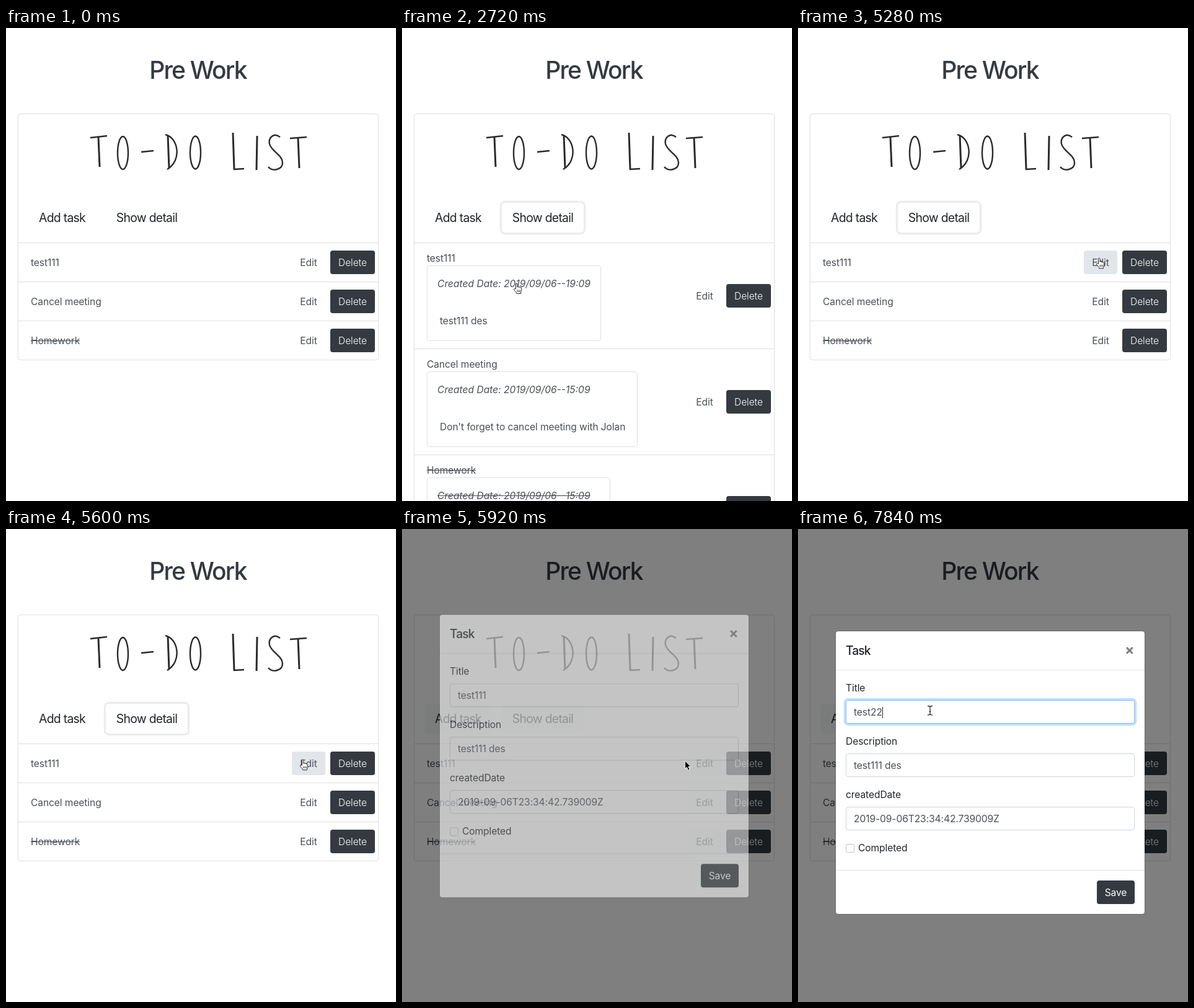
An HTML page for the animation above (8 s loop, 629 px wide and 763 px high).

```html
<!DOCTYPE html>
<html lang="en">
<head>
<meta charset="utf-8">
<title>To-do list</title>
<style>
* { box-sizing: border-box; }
html, body { margin: 0; width: 100%; height: 100%; overflow: hidden; background: #fff; }
body { position: relative; font: 15.6px/24px Inter, Roboto, sans-serif; letter-spacing: -.1px; color: #212529; white-space: nowrap; }
.abs, .btn, .field { position: absolute; }
h1 { position: absolute; left: 0; top: 43.5px; width: 619px; margin: 0; text-align: center; font-size: 39px; line-height: 48px; font-weight: 500; letter-spacing: -1.8px; color: #343a40; }
.btn { display: flex; align-items: center; justify-content: center; height: 38px; padding-top: 1px; border-radius: 4px; }
.big { top: 282px; height: 48px; padding: 0; border-radius: 5px; font-size: 19.4px; letter-spacing: -.72px; }
.dark { background: #343a40; color: #fff; font-weight: 300; }
.dim .light { background: #f5f9f9; }
.ring { box-shadow: 0 0 0 3.2px rgba(216, 217, 219, .5); }
.light.hover { background: #e2e6ea; }
#card { left: 19px; top: 138px; width: 582px; padding-top: 207px; border: 1px solid #dfdfdf; border-radius: 4px; }
.row { position: relative; display: flex; align-items: center; min-height: 63px; padding: 12px 20px; border-top: 1px solid #dfdfdf; color: #495057; }
.row .btn { top: calc(50% - 19px); }
.name { position: relative; top: 1px; }
.done .name, .done i { text-decoration: line-through; }
.detail { height: 0; overflow: hidden; }
.box { position: relative; height: 122px; border: 1px solid #dfdfdf; border-radius: 4px; }
.box i { position: absolute; left: 16px; top: 17px; letter-spacing: 0; }
.box span { position: absolute; left: 20px; top: 77px; }
#shade { inset: 0; background: #000; }
#modal { left: 61px; top: 165px; width: 498px; height: 456px; background: #fff; border-radius: 4px; box-shadow: 0 0 0 1px rgba(0, 0, 0, .2); }
#modal hr { position: absolute; left: 0; width: 100%; height: 1px; margin: 0; border: 0; background: #dee2e6; }
.field { left: 16px; width: 466px; height: 38px; padding: 7px 12px 5px; border: 1px solid #ced4da; border-radius: 4px; color: #495057; }
.field.focus { border-color: #80bdff; box-shadow: 0 0 0 3.2px rgba(0, 123, 255, .25); }
.focus::after { content: ""; display: inline-block; width: 1px; height: 18px; vertical-align: -4px; background: #222; }
svg { position: absolute; left: 0; top: 0; overflow: visible; }
</style>
</head>
<body>
<h1>Pre Work</h1>
<div id="card" class="abs"></div>
<svg width="629" height="250" fill="none" stroke="#2b2b2b" stroke-width="3">
  <path d="M149 176L151 224M261 173L263 226M366 169L368 228M405 174L404 229M471 177L473 226"/>
  <g stroke-width="2.400">
    <path d="M136 177L163 174M218 200L238 198M257 172C277 176 285 213 260 228M367 228L384 227M442 176C432 168 423 177 425 187C428 199 446 205 446 217C446 229 430 232 423 224M458 178L485 176"/>
    <ellipse cx="188.500" cy="201.500" rx="8.500" ry="26.500"/>
    <ellipse cx="305.500" cy="201" rx="8.500" ry="26.500"/>
  </g>
</svg>
<div id="add" class="btn big light" style="left:36px;width:109px">Add task</div>
<div id="show" class="btn big light" style="left:161px;width:132px">Show detail</div>
<div id="shade" class="abs"></div>
<div id="modal" class="abs">
  <b class="abs" style="left:16px;top:19px;font-size:19.4px;font-weight:500;letter-spacing:-1px">Task</b>
  <b class="abs" style="left:466px;top:18px;font-size:23px;color:#7f7f7f">×</b>
  <hr style="top:62px">
  <span class="abs" style="left:16px;top:80px">Title</span>
  <div id="title" class="field" style="top:111px"></div>
  <span class="abs" style="left:16px;top:166px">Description</span>
  <div class="field" style="top:197px">test111 des</div>
  <span class="abs" style="left:16px;top:252px">createdDate</span>
  <div class="field" style="top:283px">2019-09-06T23:34:42.739009Z</div>
  <span class="abs" style="left:16px;top:343px;width:14px;height:14px;border:1px solid #c4c4c4;border-radius:3px"></span>
  <span class="abs" style="left:36px;top:338px">Completed</span>
  <hr style="top:385px">
  <div class="btn dark" style="left:421px;top:402px;width:61px;font-weight:400">Save</div>
</div>
<svg id="cursor" width="20" height="20" stroke-linejoin="round">
  <path id="arrow" d="M0 0V13L3 10.500L5.300 15.500L7.800 14.300L5.500 9.500H9.500Z" fill="#000" stroke="#fff"/>
  <g id="hand" fill="#fff" stroke="#222">
    <path d="M-1.500 9V1a1.200 1.200 0 0 1 2.500 0V6a1.200 1.200 0 0 1 2.400 .5a1.200 1.200 0 0 1 2.300 .6a1.100 1.100 0 0 1 2 .8V11.500C7.700 13 6.700 14 6.500 16.500H0C-.5 14-3 12.500-4.500 10C-5 8.500-3 8-1.500 9Z"/>
    <path d="M1 10.500v3.500M3.200 10.500v3.500M5.400 10.500v3.500" stroke-width=".9"/>
  </g>
  <path id="beam" d="M-4-7.500C-1-7.500 0-7 0-5.500V5C0 6.500-1 7-4 7M4-7.500C1-7.500 0-7 0-5.500M0 5C0 6.500 1 7 4 7M-1.500 1.500H1.500" fill="none" stroke="#333" stroke-width="1.300"/>
</svg>
<script>
const LOOP = 8000;
const $ = id => document.getElementById(id);

const tasks = [
  ["test111", "19:09", "test111 des", 281],
  ["Cancel meeting", "15:09", "Don't forget to cancel meeting with Jolan", 340],
  ["Homework", "15:09", "", 296, "done"]
];
$("card").innerHTML = tasks.map(([name, hour, text, width, state = ""]) => `
  <div class="row">
    <div class="${state}"><span class="name">${name}</span>
      <div class="detail"><div class="box" style="width:${width}px">
        <i>Created Date: 2019/09/06--${hour}</i><span>${text}</span>
      </div></div>
    </div>
    <div class="btn light edit" style="left:441px;width:54px">Edit</div>
    <div class="btn dark" style="left:503px;width:72px">Delete</div>
  </div>`).join("");
const details = document.querySelectorAll(".detail");
const edit = document.querySelector(".edit");

// Pointer path: time, x, y
const path = [
  [160, 352, 144], [480, 262, 262], [640, 221, 302], [800, 232, 311],
  [1600, 232, 311], [2080, 222, 312], [2240, 216, 314], [2560, 190, 402],
  [2720, 185, 412], [2880, 185, 411], [3200, 206, 345], [3680, 222, 310],
  [4560, 224, 308], [4800, 330, 340], [5120, 486, 371], [5560, 486, 372],
  [5720, 458, 373], [5960, 456, 374], [6400, 213, 296], [6880, 213, 296],
  [7040, 213, 293]
];
const typed = [[0, "test111"], [7030, "test11"], [7190, "test1"], [7350, "test"], [7590, "test2"], [7830, "test22"]];

const ramp = (t, start, length) => Math.min(1, Math.max(0, (t - start) / length));
const smooth = p => p * p * (3 - 2 * p);

function pointer(t) {
  const i = path.findIndex(k => k[0] > t);
  if (i < 0) return path[path.length - 1].slice(1);
  if (i === 0) return path[0].slice(1);
  const [a, b] = [path[i - 1], path[i]];
  const p = (t - a[0]) / (b[0] - a[0]);
  return [a[1] + (b[1] - a[1]) * p, a[2] + (b[2] - a[2]) * p];
}

function shape(t) {
  if (t < 1120) return "arrow";
  if (t < 4680) return "hand";
  if (t < 5060) return "arrow";
  if (t < 5620) return "hand";
  return t < 6260 ? "arrow" : "beam";
}

function draw(t) {
  const [x, y] = pointer(t);
  const over = (l, top, r, b) => x >= l && x <= r && y >= top && y <= b;

  const open = smooth(ramp(t, 1600, 350)) - smooth(ramp(t, 4300, 350));
  details.forEach(d => d.style.height = 122 * open + "px");

  $("add").classList.toggle("ring", t >= 1120 && t < 1600);
  $("show").classList.toggle("ring", t >= 1600 && t < 5640);
  $("show").classList.toggle("hover", t >= 1120 && t < 5000 && over(161, 282, 293, 330));
  edit.classList.toggle("hover", t > 4800 && t < 5620 && over(461, 359, 515, 397));

  document.body.classList.toggle("dim", t >= 5680);
  $("shade").style.opacity = .5 * ramp(t, 5680, 150);
  $("modal").style.opacity = ramp(t, 5840, 150);
  $("modal").style.transform = `translateY(${-50 * (1 - ramp(t, 5840, 300)) ** 2}px)`;

  $("title").textContent = typed.filter(k => k[0] <= t).pop()[1];
  $("title").classList.toggle("focus", t >= 6720);

  $("cursor").style.display = t < 160 ? "none" : "";
  $("cursor").style.transform = `translate(${x}px, ${y}px)`;
  for (const id of ["arrow", "hand", "beam"]) $(id).style.display = id === shape(t) ? "" : "none";
}

const start = performance.now();
function tick() {
  draw((performance.now() - start) % LOOP);
  requestAnimationFrame(tick);
}
tick();
</script>
</body>
</html>
```
